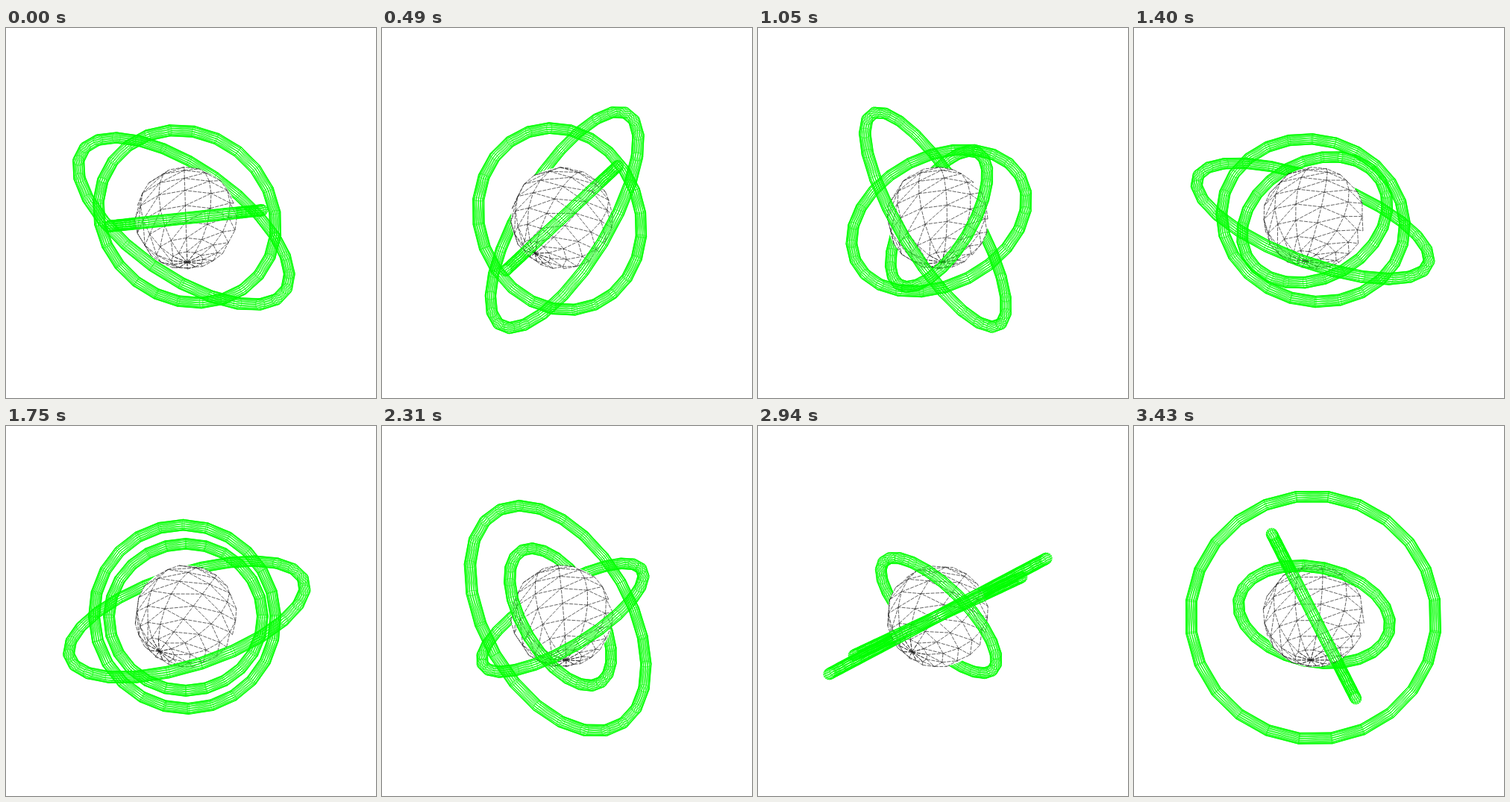
Animation of 496x496 px, one loop 3.5 s. Source, as an HTML page with a canvas:

```html
<!DOCTYPE html>
<html>
<head>
<meta charset="utf-8">
<title>Orbiting rings</title>
<style>
html, body { margin: 0; width: 100%; height: 100%; overflow: hidden; background: #fff; }
canvas { display: block; }
</style>
</head>
<body>
<canvas width="496" height="496"></canvas>
<script>
const ctx = document.querySelector('canvas').getContext('2d');
const CX = 241, CY = 255, CAMERA = 2200;
const STEP = 70, LOOP = 3500, TAU = 2 * Math.PI;
const TUBE = 7.5, BALL = 68.5;

// Each ring swings between a few poses, in degrees:
// turn is the heading of its axis on the screen, tilt the lean away from the viewer.
const KEYS = [0, 7, 15, 25, 33, 42, 49];
const rings = [
  { radius: 165, turn: [-125, -31, 31, 108, 30, 118, 68], tilt: [-64, -69, 73, 68, 54, 90, 9] },
  { radius: 124, turn: [52, 21, 117, 31, 121, 115, 27], tilt: [-27, 30, 46, 13, 71, 90, 90] },
  { radius: 103, turn: [96, 133, 149, 90, 31, 45, 78], tilt: [90, 90, 65, 17, 61, 111, 128] }
];

function mix(values, step) {
  const i = Math.max(1, KEYS.findIndex(k => k >= step));
  const u = (step - KEYS[i - 1]) / (KEYS[i] - KEYS[i - 1]);
  return values[i - 1] + u * (values[i] - values[i - 1]);
}

// Maps a point given around an axis (angle, distance r, height h) to the screen.
function placer(turn, tilt) {
  const a = turn * TAU / 360, b = tilt * TAU / 360;
  const ca = Math.cos(a), sa = Math.sin(a), cb = Math.cos(b), sb = Math.sin(b);
  return (angle, r, h) => {
    const p = r * Math.cos(angle), q = r * Math.sin(angle);
    const x = p * cb + h * sb, z = h * cb - p * sb;
    const scale = CAMERA / (CAMERA - z);
    return [CX + scale * (x * ca - q * sa), CY - scale * (x * sa + q * ca), z];
  };
}

// Triangulated grid, split into the wires in front of and behind the centre plane.
function wires(cols, rows, point) {
  const front = new Path2D(), back = new Path2D();
  const at = (i, j) => point(i / cols * TAU, j / rows);
  const line = (p, q) => {
    const path = p[2] + q[2] > 0 ? front : back;
    path.moveTo(p[0], p[1]);
    path.lineTo(q[0], q[1]);
  };
  for (let i = 0; i < cols; i++) {
    for (let j = 0; j < rows; j++) {
      const right = at(i + 1, j), below = at(i, j + 1);
      line(at(i, j), right);
      line(at(i, j), below);
      line(right, below);
    }
  }
  return { front, back };
}

function torus({ radius, turn, tilt }, step) {
  const place = placer(mix(turn, step), mix(tilt, step));
  return wires(24, 16, (u, v) =>
    place(u, radius + TUBE * Math.cos(v * TAU), TUBE * Math.sin(v * TAU)));
}

function ball(step) {
  const place = placer(-105 + 22 * Math.cos((step - 16) / 18 * TAU), 58);
  const spin = step / 50 * TAU;
  return wires(12, 10, (u, v) =>
    place(u + spin, BALL * Math.sin(v * Math.PI), BALL * Math.cos(v * Math.PI)));
}

function trace(path, color, width) {
  ctx.strokeStyle = color;
  ctx.lineWidth = width;
  ctx.stroke(path);
}

function draw(step) {
  const hoops = rings.map(ring => torus(ring, step));
  const green = path => trace(path, 'rgba(0, 255, 0, .58)', 1);
  ctx.fillStyle = '#fff';
  ctx.fillRect(0, 0, 496, 496);

  hoops.forEach(hoop => green(hoop.back));

  ctx.beginPath();
  ctx.arc(CX, CY, BALL - .5, 0, TAU);
  ctx.fill();
  ctx.setLineDash([5, 1.5]);
  trace(ball(step).front, '#222', .7);
  ctx.setLineDash([]);

  hoops.forEach(hoop => green(hoop.front));
}

const start = performance.now();
let shown = -1;
function tick() {
  const step = Math.floor((performance.now() - start) % LOOP / STEP);
  if (step !== shown) draw(shown = step);
  requestAnimationFrame(tick);
}
tick();
</script>
</body>
</html>
```
